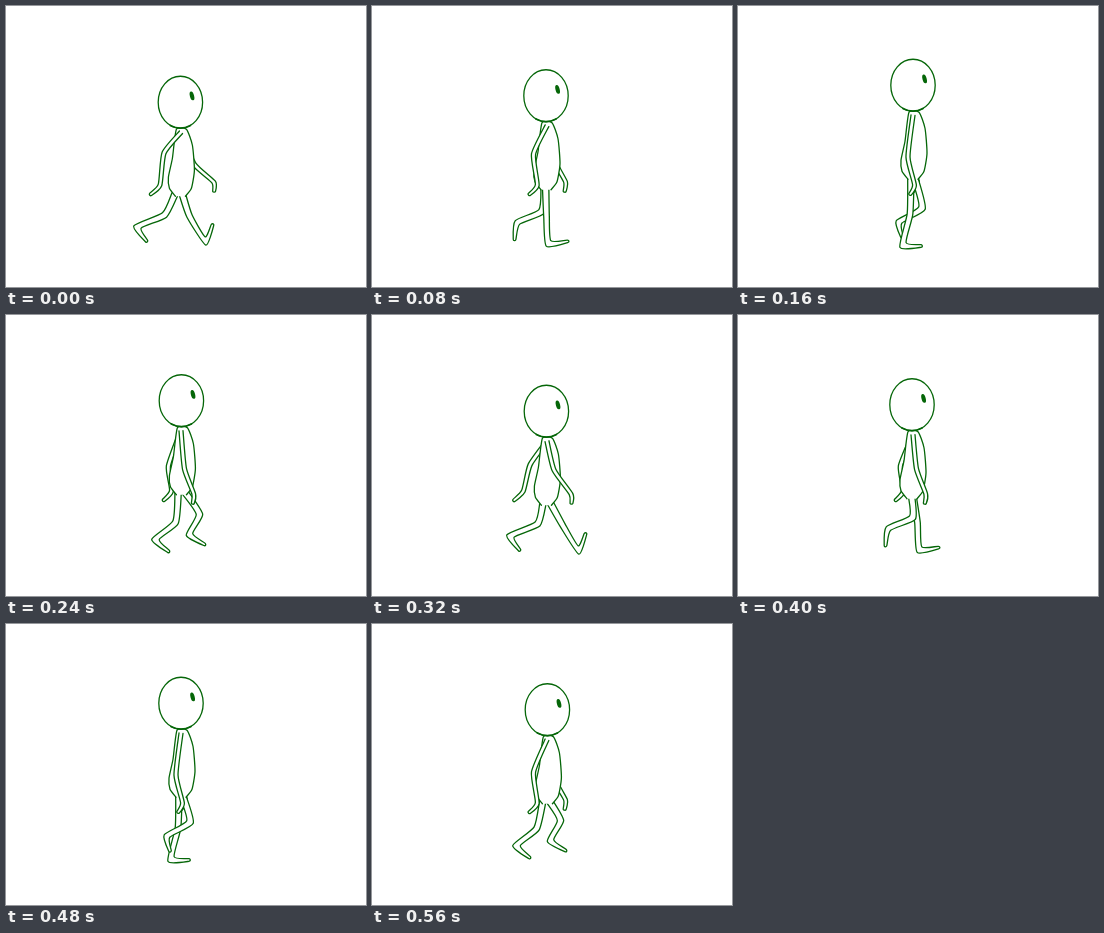
An HTML page that plays this animation: 360 by 281 pixels, repeating every 640 ms.

```html
<!DOCTYPE html>
<html lang="en">
<head>
<meta charset="utf-8">
<title>Walk cycle</title>
<style>
  html, body { margin: 0; width: 100%; height: 100%; overflow: hidden; background: #fff; }
  svg { display: block; width: 100vw; height: 100vh; }
  g { fill: #fff; stroke: #056608; stroke-width: 1.3; stroke-linecap: round; stroke-linejoin: round; }
  .eye { fill: #056608; stroke: none; }
  .chin { fill: none; stroke-width: 1.8; }
</style>
</head>
<body>
<svg id="stage" viewBox="0 0 360 281"></svg>
<script>
const STEP = 80, POSES = 8;
const { cos, sin, abs, max, hypot, PI } = Math;

// Knee, heel and toe through one stride; the far leg runs half a cycle later.
const stride = [
  '187,210 203,235 210,219', // heel strike
  '177,209 179,236 198,234', // weight taken
  '172,206 165,237 183,238', // standing
  '167,206 147,223 160,235', // heel lifts
  '162,209 135,221 144,235', // toe off
  '172,204 148,215 145,232', // pull through
  '184,200 161,214 164,229', // passing
  '191,198 181,218 196,228'  // reach
].map(points);

function points(text) {
  return text.split(' ').map(pair => pair.split(',').map(Number));
}

// Slightly rounded curve through the points, keeping heels and knees crisp.
function curve(pts) {
  const at = i => pts[max(0, Math.min(pts.length - 1, i))];
  const handle = (i, side) => at(i).map((v, k) => v + side * (at(i + 1)[k] - at(i - 1)[k]) / 10);
  return pts.map((p, i) => i ? `C${handle(i - 1, 1)} ${handle(i, -1)} ${p}` : `M${p}`).join('');
}

// Normal of the segment a-b.
function normal([ax, ay], [bx, by]) {
  const length = hypot(bx - ax, by - ay) || 1;
  return [(ay - by) / length, (bx - ax) / length];
}

// Outline around a chain of joints, open at the first one.
function limb(joints, halfWidths) {
  const side = sign => joints.map((p, i) => {
    const after = joints[i + 1] ? normal(p, joints[i + 1]) : normal(joints[i - 1], p);
    const before = i ? normal(joints[i - 1], p) : after;
    const [x, y] = [before[0] + after[0], before[1] + after[1]];
    const size = hypot(x, y) || 1;
    const reach = sign * halfWidths[i] / max(0.6, size / 2);
    return [p[0] + x / size * reach, p[1] + y / size * reach];
  });
  return `<path d="${curve([...side(1), ...side(-1).reverse()])}"/>`;
}

function leg(phase, hipY, swayX, swayY) {
  const joints = stride[phase % POSES].map(([x, y]) => [x + swayX, y + swayY]);
  const hipX = 173.5 + (joints[0][0] - 174) * 0.3;
  return limb([[hipX, hipY], ...joints], [3.2, 2.8, 2.5, 1.3]);
}

// swing runs from -1 (back) to 1 (forward).
function arm(swing, shoulder, shift, reach) {
  const elbow = [170 + shift + 12 * reach * swing, 151 + shift + 4 * swing];
  const wrist = [176.5 + shift + 22.5 * reach * swing * abs(swing), 179 - shift];
  const hand = [wrist[0] - 4.5 + 5 * swing, wrist[1] + 9.5];
  return limb([shoulder, elbow, wrist, hand], [2, 2, 1.8, 1.4]);
}

function drawPose(i) {
  const turn = 2 * PI * i / POSES;
  const c = cos(turn), s = sin(turn);
  const x = 174.7 - 0.3 * cos(2 * turn) - 0.7 * sin(2 * turn);
  const y = 87.75 + 8.5 * cos(2 * turn) + 2 * sin(2 * turn);
  const hipY = y + 92, shoulder = [175, y + 30];
  const makeLeg = phase => leg(phase, hipY, -3.5 * c, 2 * s);
  const body = points('-5,94 -11,86 -12,75 -8,56 -4,27 6,27 12,43 14,68 11,86 5,94')
    .map(([dx, dy]) => [x + dx, y + dy]);

  return `<g opacity="0">
    ${arm(c, shoulder, 3, 1.25)}
    ${makeLeg(i + POSES / 2)}
    ${makeLeg(i)}
    <path d="${curve(body)}"/>
    ${arm(-c, shoulder, 0, 1)}
    <ellipse cx="${x}" cy="${y}" rx="22.2" ry="26"/>
    <path class="chin" d="M${x - 10} ${y + 23.3}Q${x} ${y + 28.6} ${x + 10} ${y + 23.3}"/>
    <ellipse class="eye" rx="2.1" ry="4.5" transform="translate(${x + 11.6} ${y - 6.3}) rotate(-15)"/>
  </g>`;
}

const stage = document.getElementById('stage');
stage.innerHTML = Array.from({ length: POSES }, (_, i) => drawPose(i)).join('');

const duration = STEP * POSES;
[...stage.children].forEach((pose, i) => pose.animate([
  { opacity: 1, offset: 0, easing: 'step-end' },
  { opacity: 0, offset: 1 / POSES },
  { opacity: 0, offset: 1 }
], { duration, delay: i * STEP - duration, iterations: Infinity }));
</script>
</body>
</html>
```
